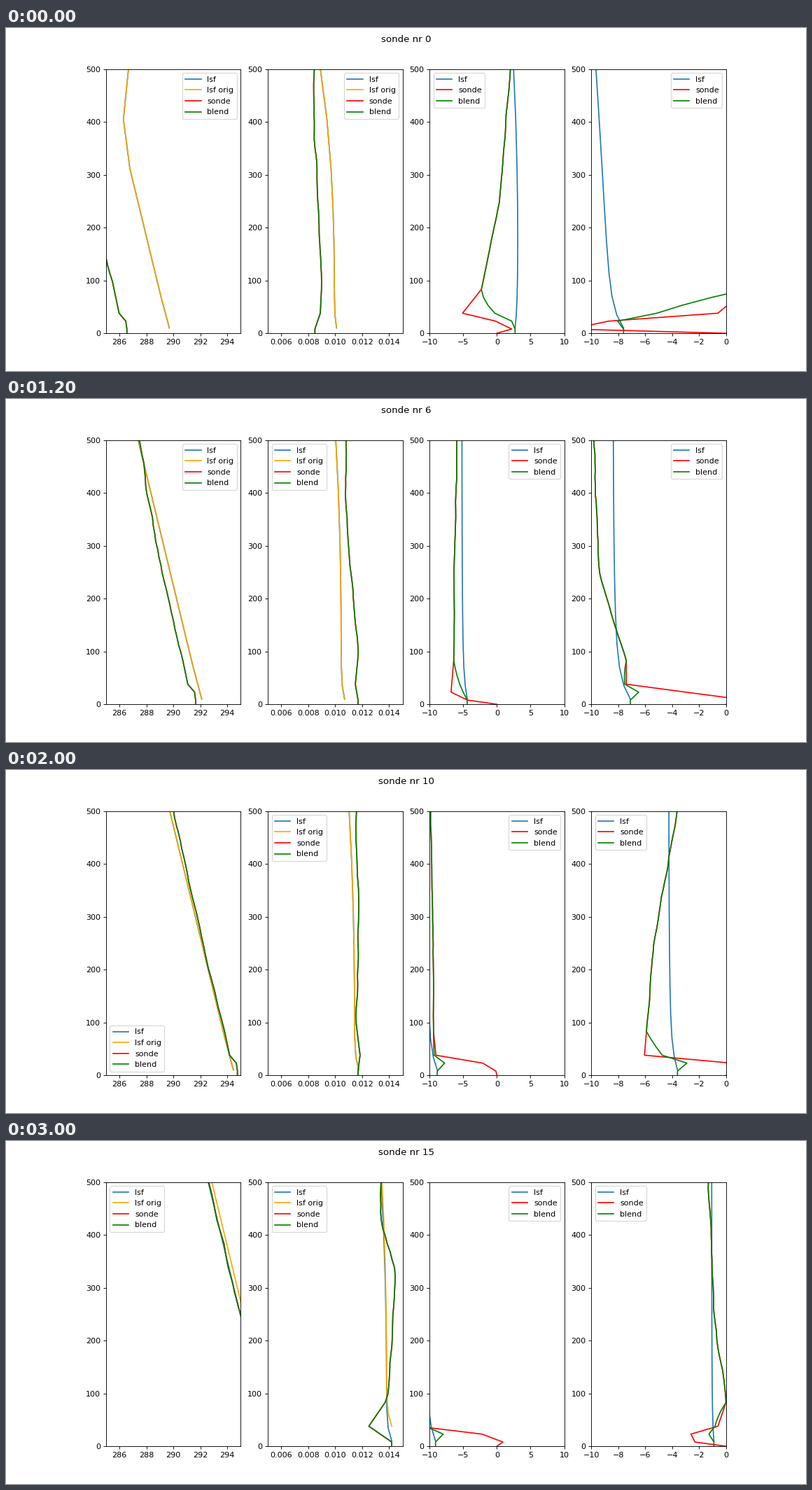
A matplotlib script for the animation above (3.2 s loop, 1143x490 px).

```python
import numpy as np
import matplotlib.pyplot as plt
from matplotlib.animation import FuncAnimation

COUNT = 16
DPI = 80
LIMITS = {"T": (285, 295), "q": (0.005, 0.015), "u": (-10, 10), "v": (-10, 0)}
MODEL_H = np.array([10, 35, 70, 115, 170, 235, 312, 405, 505])
SONDE_H = np.append(0, np.arange(8, 520, 15))

# Key values are given for these sondes and interpolated for the others
KEYS = [0, 2, 4, 6, 9, 11, 15]

# Model values near the ground
GROUND = {
    "T": [289.7, 289.7, 291.3, 292.1, 293.6, 295.3, 297.3],
    "q": [10.1, 9.8, 10.6, 10.7, 11.3, 12.2, 14.2],
    "u": [2.7, 2, -1.8, -4.4, -8.2, -9.5, -9.1],
    "v": [-7.6, -7, -7.9, -7.1, -4.5, -2.7, -.9],
}

# Sounding values at a few heights
SOUNDING = {
    "T": {83: [285.6, 287.3, 291, 290.7, 293.6, 294, 296.6],
          500: [283, 284.4, 287.7, 287.5, 289.7, 290.4, 292.6]},
    "q": {8: [8.5, 9.4, 10.7, 11.7, 10.6, 12.8, 14.2],
          38: [8.9, 10, 11.1, 11.5, 10.9, 12.8, 12.5],
          90: [9, 9.8, 11.2, 11.7, 10.3, 12.9, 13.9],
          330: [8.6, 9.2, 11.2, 10.9, 10.4, 13.1, 14.5],
          430: [8.4, 9.1, 11.2, 10.8, 10.4, 12.7, 13.4]},
    "u": {0: [0] * 7,
          8: [2.2, -6, -11.4, -4.4, -1.1, .8, .9],
          23: [-.2, -5, -8, -6.8, -2.9, -1.3, -2.2],
          38: [-5.1, -.9, -4.9, -6.7, -8.9, -9.2, -11.9],
          83: [-2.3, .8, -4.2, -6.4, -9, -9.8, -12],
          250: [.4, 1.1, -4.5, -6.3, -9.4, -9.5, -12],
          500: [2, .6, -3.8, -5.9, -9.9, -9.8, -12]},
    "v": {0: [0] * 7,
          8: [-11.5, -11.7, -2.8, 1.5, 1.5, 1.5, -2.3],
          23: [-8.7, -9.7, -6.5, -3, .4, .4, -2.6],
          38: [-.6, -4.8, -9.9, -7.4, -5.7, -6.4, -.6],
          83: [1.5, -4.8, -11, -7.4, -5.9, -5.9, 0],
          250: [2, -5.2, -11.5, -9.4, -5.7, -5, -.9],
          500: [2, -5.2, -11.5, -9.8, -4.2, -3, -1.3]},
}


def at(values, n):
    return np.interp(n, KEYS, values)


def decay(h, depth):
    return np.exp(-(h - 10) / depth)


def model(name, n):
    """Model profile: surface layer, steady trend, and a change aloft early on."""
    h = MODEL_H
    ground = at(GROUND[name], n)
    aloft = np.interp(n, [0, 2, 4, 6], [.7, 1.5, .1, 0])
    s = np.clip((h - 70) / 430, 0, None)
    if name == "T":
        inversion = min(1, 1.4 * aloft) * 4.8e-5 * np.clip(h - 312, 0, None) ** 2
        return ground - .3 + .3 * decay(h, 12) - .0095 * (h - 35).clip(0) + inversion
    if name == "q":
        surface = (.16 + .015 * n) * (decay(h, 21) - 1)
        return (ground + surface - (.4 + .9 * aloft) * s ** 2.5) / 1000
    growth = 1 + .11 * (1 - decay(h, 35)) + .07 * (1 - decay(h, 150))
    return ground * growth - aloft * s ** (2.5 if name == "u" else 1.5)


def sounding(name, n):
    """Measured profile: lines through the key heights with a fine wiggle."""
    h = SONDE_H
    heights = list(SOUNDING[name])
    values = [at(row, n) for row in SOUNDING[name].values()]
    if name == "T":
        low, high = values
        x = (h - 83).clip(0)
        bend = (high - low + .01 * 417) / 417 ** 2
        warm = np.interp(h, [8, 23, 38, 83], [.95, .87, .37, 0])
        obs = low - .01 * x + bend * x ** 2 + warm
    else:
        obs = np.interp(h, heights, values)
    rng = np.random.default_rng(n * 4 + "Tquv".index(name))
    noise = np.convolve(rng.normal(0, 1, len(h)), np.ones(3) / 3, "same")
    obs = obs + .05 * noise * (h > 83)
    return obs / 1000 if name == "q" else obs


def legend_loc(name, n):
    if name == "T":
        return "upper right" if n < 9 else "lower left" if n < 11 else "upper left"
    left = {"q": n >= 4, "u": n < 2, "v": n >= 10}[name]
    return "upper left" if left else "upper right"


fig, axes = plt.subplots(1, 4, figsize=(1143 / DPI, 490 / DPI), dpi=DPI)
title = fig.suptitle("sonde nr 0")
lines, legends = {}, {}
for ax, (name, limits) in zip(axes, LIMITS.items()):
    styles = {"lsf": "C0", "lsf orig": "orange", "sonde": "red", "blend": "green"}
    if name in "uv":
        del styles["lsf orig"]
    lines[name] = {label: ax.plot([], [], color=color, label=label)[0]
                   for label, color in styles.items()}
    ax.set_xlim(limits)
    ax.set_ylim(0, 500)
    legends[name] = ax.legend(loc="upper right")

# The winds fade from model to sounding over the lowest levels
weight = np.clip((SONDE_H - 8) / 75, 0, 1)


def update(n):
    title.set_text(f"sonde nr {n}")
    lift = np.interp(n, [11, 15], [1, 28])
    for name, group in lines.items():
        lsf, obs = model(name, n), sounding(name, n)
        blend = obs
        if name in "uv":
            base = np.interp(SONDE_H, MODEL_H, lsf)
            blend = base + weight * (obs - base)
        else:
            group["lsf orig"].set_data(lsf, MODEL_H + lift)
        group["lsf"].set_data(lsf, MODEL_H)
        group["sonde"].set_data(obs, SONDE_H)
        group["blend"].set_data(blend, SONDE_H)
        legends[name].set_loc(legend_loc(name, n))


anim = FuncAnimation(fig, update, frames=COUNT, init_func=lambda: update(0),
                     interval=200, repeat=True, repeat_delay=0, blit=False)
plt.show()
```
